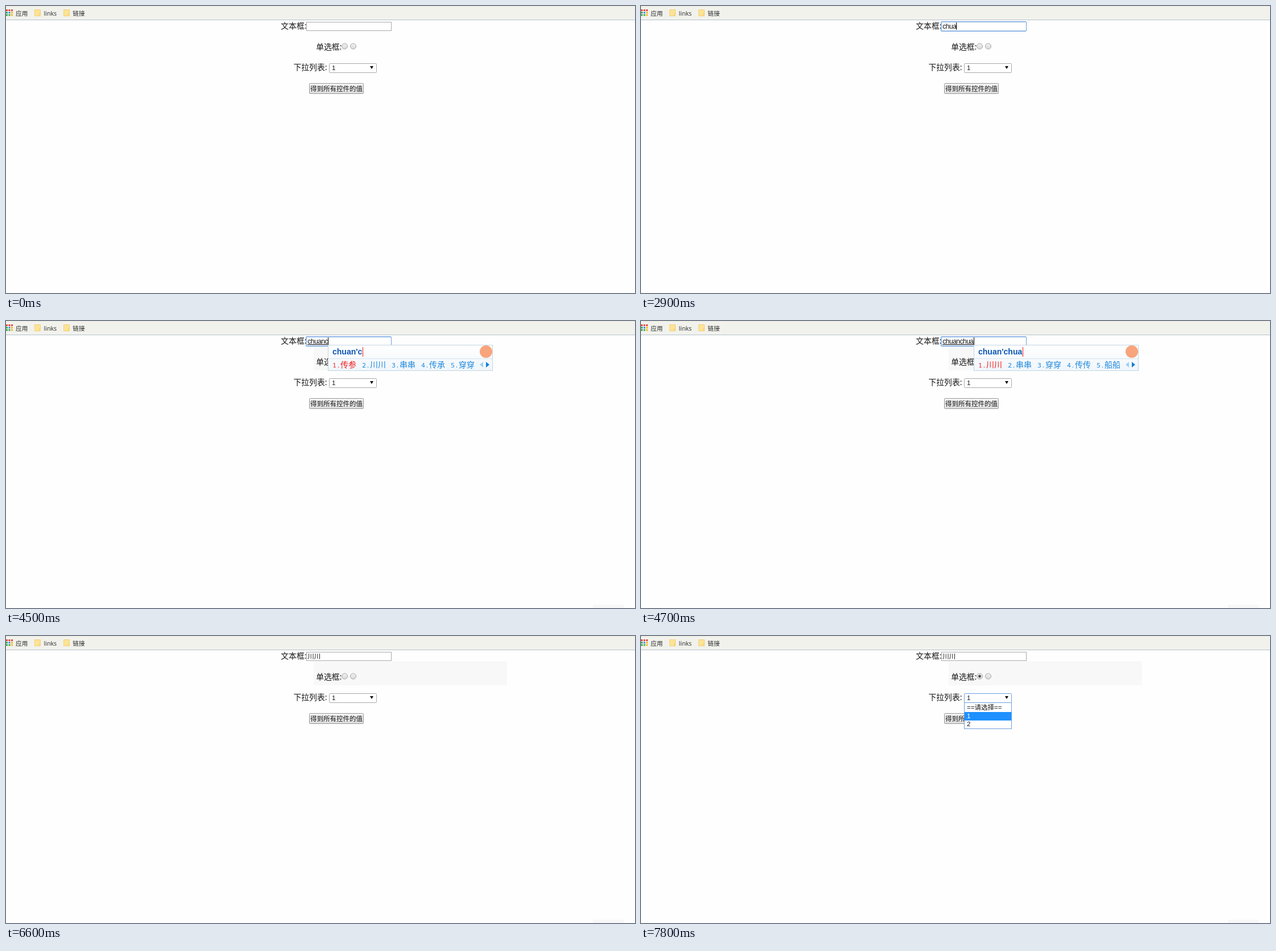
An HTML page for the animation above (8 s loop, 1106 by 506 pixels).

```html
<!DOCTYPE html>
<html lang="zh-CN">
<head>
<meta charset="utf-8">
<title>表单控件</title>
<style>
  html, body { margin: 0; width: 100%; height: 100%; overflow: hidden; background: #fefefe; }
  svg { display: block; width: 1106px; height: 506px; }
  text { font-family: "Liberation Sans", "Noto Sans CJK SC", "Noto Sans CJK", sans-serif; fill: #161616; white-space: pre; }
  .bar { font: 10.7px "Open Sans", "Noto Sans CJK SC", "Noto Sans CJK", sans-serif; fill: #2a2a2a; }
  .label { font: 13.8px "Noto Sans CJK SC", "Noto Sans CJK", sans-serif; }
  .small { font-size: 11.5px; }
  .num { font-size: 11.5px; }
  .latin { font-size: 12px; letter-spacing: -.5px; }
  .pinyin { font-weight: bold; font-size: 14px; fill: #0c56b3; }
  .cand { font: 14px "Noto Sans CJK SC", "Noto Sans CJK", sans-serif; fill: #1a86dc; }
  .cand .no { font: 11.67px "Noto Sans Mono", monospace; }
  .cand.first { fill: #f01c1c; }
  .ctl { fill: #fff; stroke: #a9a9a9; }
  .focus { stroke: #6b9fe0; }
  .radio { fill: url(#knob); stroke: #a6a6a6; }
</style>
</head>
<body>
<svg viewBox="0 0 1106 506">
  <defs>
    <linearGradient id="knob" x2="0" y2="1">
      <stop stop-color="#f2f2f2"/><stop offset="1" stop-color="#d8d8d8"/>
    </linearGradient>
    <linearGradient id="face" x2="0" y2="1">
      <stop stop-color="#f5f5f5"/><stop offset="1" stop-color="#dcdcdc"/>
    </linearGradient>
    <linearGradient id="sheet" x2="0" y2="1">
      <stop stop-color="#fff"/><stop offset="1" stop-color="#f0f6fb"/>
    </linearGradient>
    <g id="folder">
      <path d="M.5 .5h10v11h-10z" fill="#fde396" stroke="#f3d273"/>
      <path d="M8.5 11.5v-4h2" fill="none" stroke="#f3d273"/>
    </g>
  </defs>

  <rect width="1106" height="24" fill="#f2f2ed"/>
  <rect width="1106" height="1" fill="#e9ebdc"/>
  <rect y="24" width="1106" height="1" fill="#b5c0ca"/>
  <g id="apps"></g>
  <text class="bar" x="17" y="16.5">应用</text>
  <use href="#folder" x="50" y="6"/>
  <text class="bar" x="66.5" y="16.5">links</text>
  <use href="#folder" x="101" y="6"/>
  <text class="bar" x="117.3" y="16.5">链接</text>

  <rect id="shade" x="541" y="45" height="42" fill="#f8f8f8"/>
  <g id="tip">
    <rect x="1032" y="500" width="55" height="10" rx="2" fill="#f8f8f8"/>
    <text id="tipText" class="small" x="1038" y="514" style="fill:#d4d4d4">中文输入</text>
  </g>

  <text class="label" x="483.3" y="40">文本框:</text>
  <rect id="field" class="ctl" x="528.5" y="28.5" width="149" height="15"/>
  <rect id="ring" class="focus" x="527.5" y="27.5" width="150" height="17" rx="1.5" fill="none"/>
  <text id="value" x="530.3" y="40"></text>
  <rect id="underline" x="530" y="41" height="1"/>
  <rect id="caret" y="29" width="1" height="13"/>

  <text class="label" x="545.2" y="77">单选框:</text>
  <circle class="radio" cx="595.5" cy="71" r="5"/>
  <circle class="radio" cx="610.5" cy="71" r="5"/>
  <circle id="dot" cx="595.5" cy="71" r="2.4" fill="#4c4c4c"/>

  <text class="label" x="505.5" y="113">下拉列表:</text>
  <rect id="select" class="ctl" x="568.5" y="101.5" width="83" height="16" rx="1"/>
  <text class="num" x="573" y="113">1</text>
  <path d="M640 106h6l-3 5z"/>

  <rect x="533.5" y="136.5" width="95" height="18" rx="1" fill="url(#face)" stroke="#9a9a9a"/>
  <text class="small" x="535" y="150.3">得到所有控件的值</text>

  <g id="list">
    <rect class="focus" x="568.5" y="117.5" width="83" height="46" fill="#fff"/>
    <rect id="mark" x="569" width="82" fill="#1e90ff"/>
    <text id="row0" class="small" x="573" y="130.3">==请选择==</text>
    <text id="row1" class="num" x="573" y="145">1</text>
    <text class="num" x="573" y="159">2</text>
  </g>

  <g id="popup">
    <rect x=".5" y=".5" width="289" height="45" fill="url(#sheet)" stroke="#c3d5e3"/>
    <rect x="1" y="24" width="288" height="1" fill="#d3e3ef"/>
    <circle cx="278" cy="12" r="11" fill="#f8a47c"/>
    <text id="pinyin" class="pinyin" x="8" y="17"></text>
    <rect id="pinyinCaret" y="4" width="1" height="17" fill="#f01c1c"/>
    <g id="cands"></g>
    <path d="M273 30v10l-6-5z" fill="#9fd0f2"/>
    <path d="M278 30v10l6-5z" fill="#0f7fd8"/>
  </g>
</svg>

<script>
const LOOP = 8000, LEFT = 530.3;
const $ = id => document.getElementById(id);
const show = (id, on) => { $(id).style.display = on ? '' : 'none'; };
const set = (id, attrs) => { for (const k in attrs) $(id).setAttribute(k, attrs[k]); };

['#e8453c', '#e8453c', '#e8453c', '#34a853', '#4285f4', '#f5b91a', '#34a853', '#34a853', '#f5b91a']
  .forEach((c, i) => {
    $('apps').innerHTML += `<rect x="${i % 3 * 4.5}" y="${6 + (i / 3 | 0) * 4.2}" width="3" height="3" fill="${c}"/>`;
  });

// Each step changes part of the state from its time on.
const steps = [
  [0, { text: '', focus: 0, caret: 0, words: '', pinyin: '', ime: 0, tip: 0, radio: 0, select: 0, row: -1 }],
  [600, { focus: 1, caret: 1 }],
  [1000, { caret: 0 }],
  [1300, { text: 'c', caret: 1 }],
  [1400, { text: 'ch' }],
  [1500, { text: 'chu' }],
  [1600, { text: 'chua' }],
  [2000, { text: 'chu' }],
  [2100, { text: 'ch' }],
  [2200, { text: 'c' }],
  [2300, { text: '' }],
  [2700, { text: 'c' }],
  [2800, { text: 'chu' }],
  [2900, { text: 'chua' }],
  [3300, { text: 'chu' }],
  [3400, { text: 'ch' }],
  [3500, { text: 'c' }],
  [3600, { text: '' }],
  [4000, { caret: 0, tip: 1 }],
  [4200, { text: 'ch', pinyin: 'ch', words: '吃 出 成 长 车', caret: 1, ime: 1, tip: 2 }],
  [4300, { text: 'chu', pinyin: 'chu', words: '出 处 除 初 楚' }],
  [4400, { text: 'chuan', pinyin: 'chuan', words: '传 穿 川 船 串' }],
  [4500, { text: 'chuanc', pinyin: "chuan'c", words: '传参 川川 串串 传承 穿穿' }],
  [4600, { text: 'chuanch', pinyin: "chuan'ch", words: '川川 串串 传承 穿穿 传出' }],
  [4700, { text: 'chuanchua', pinyin: "chuan'chua", words: '川川 串串 穿穿 传传 船船' }],
  [4800, { text: 'chuanchuan', pinyin: "chuan'chuan" }],
  [5200, { words: '' }],
  [5300, { text: '川川', ime: 0 }],
  [5700, { caret: 0 }],
  [6200, { caret: 1 }],
  [6600, { focus: 0, caret: 0 }],
  [6700, { radio: 1 }],
  [7200, { select: 1 }],
  [7500, { row: 1 }],
  [7700, { row: 0 }],
  [7800, { row: 1 }]
];

function candidates(words) {
  let x = 8;
  return words.split(' ').map((w, i) => {
    const item = `<text class="cand${i ? '' : ' first'}" y="40"><tspan class="no" x="${x}">${i + 1}.</tspan><tspan x="${x + 14}">${w}</tspan></text>`;
    x += 24 + w.length * 14;
    return item;
  }).join('');
}

function draw(s, t) {
  const value = $('value');
  value.setAttribute('class', s.text === '川川' ? 'small' : 'latin');
  value.textContent = s.text;
  const end = Math.round(LEFT + (s.text ? value.getComputedTextLength() : 0));

  $('field').style.stroke = s.focus ? '#b4cdec' : '';
  show('ring', s.focus);
  show('caret', s.caret);
  set('caret', { x: end });
  show('underline', s.ime);
  set('underline', { width: end - 530 });

  show('popup', s.words);
  if (s.words) {
    set('popup', { transform: `translate(${end} 42)` });
    $('pinyin').textContent = s.pinyin;
    set('pinyinCaret', { x: Math.round(8.5 + $('pinyin').getComputedTextLength()) });
    $('cands').innerHTML = candidates(s.words);
  }
  show('shade', t >= 4200);
  set('shade', { width: s.words ? end - 541 + 290 : 340 });
  show('tip', s.tip);
  show('tipText', s.tip === 1);

  show('dot', s.radio);
  set('select', { class: s.select ? 'ctl focus' : 'ctl' });
  show('list', s.row >= 0);
  set('mark', s.row ? { y: 134, height: 15 } : { y: 118, height: 16 });
  $('row0').style.fill = s.row === 0 ? '#fff' : '';
  $('row1').style.fill = s.row === 1 ? '#fff' : '';
}

let last = -1;
const start = performance.now();
function tick() {
  const t = (performance.now() - start) % LOOP;
  const past = steps.filter(([at]) => at <= t);
  if (past.length !== last) {
    last = past.length;
    draw(Object.assign({}, ...past.map(([, change]) => change)), t);
  }
  requestAnimationFrame(tick);
}
tick();
</script>
</body>
</html>
```
